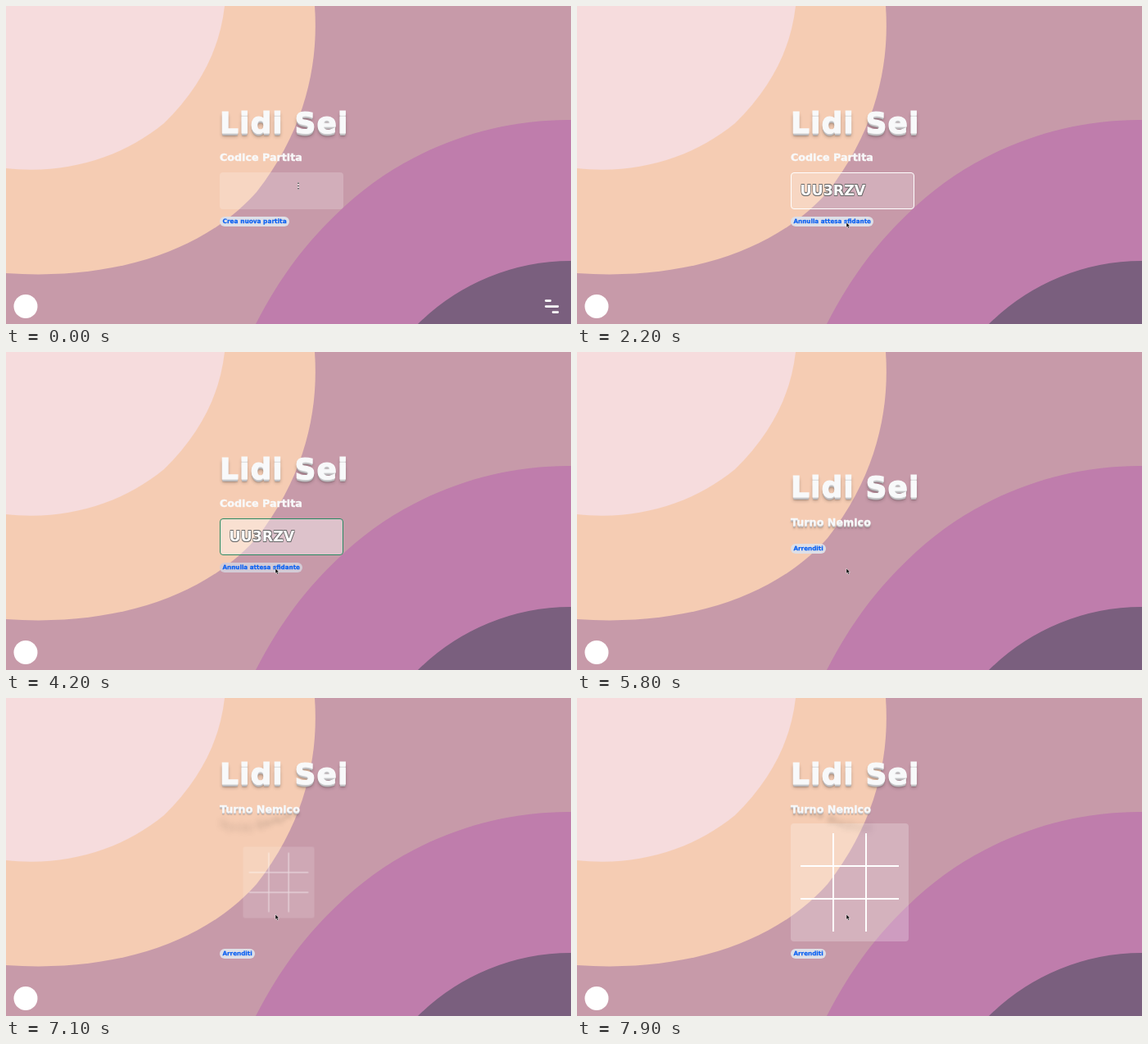
An HTML page that plays this animation: 690x388 px, repeating every 8 s.

```html
<!DOCTYPE html>
<html lang="it">
<head>
<meta charset="utf-8">
<title>Lidi Sei</title>
<style>
  html, body { margin: 0; width: 100%; height: 100%; overflow: hidden; }
  .stage {
    position: relative; width: 690px; height: 388px; overflow: hidden;
    background: #c79aa9; color: #f8f9fa;
    font: bold 12.7px/1 "DejaVu Sans", sans-serif; white-space: nowrap;
  }
  .stage * { box-sizing: border-box; }
  .stage div, .stage svg { position: absolute; }
  .anim { animation: 8s linear infinite; }
  .hard { animation: 8s step-end infinite; }

  .title {
    left: 261px; top: 125px; font-size: 36px; letter-spacing: 1.1px;
    -webkit-text-stroke: 1.2px #f8f9fa;
    text-shadow: 0 1px 0 #d4d4d6, 0 2px 0 #c6c6c8, 0 3px 0 #b8b6b9,
      0 4px 1px rgba(0,0,0,.12), 0 4px 4px rgba(0,0,0,.3);
    animation-name: title;
  }
  .heading { left: 261px; top: 178.8px; -webkit-text-stroke: .4px #f8f9fa; }
  .field {
    left: 261px; top: 202.6px; width: 151px; height: 45.2px;
    border: 1.2px solid transparent; border-radius: 4px;
    background: rgba(255,255,255,.2); animation-name: field;
  }
  .code {
    left: 272.5px; top: 217px; font-size: 17.4px; color: #fff;
    text-shadow: .6px .6px #666, -.6px .6px #666, .6px -.6px #666, -.6px -.6px #666;
  }
  .button {
    left: 261px; top: 257px; height: 12px; padding: 0 3px 0 3.5px;
    border-radius: 6px; background: #dedfe7; color: #0d62f2;
    font-size: 7.2px; line-height: 11.8px; -webkit-text-stroke: .25px #0d62f2;
  }
  .create { font-size: 7.4px; }
  .cancel { animation-name: cancel; }
  .give-up { top: 306px; animation-name: give-up; }
  .turn {
    left: 261px; top: 130px; animation-name: turn;
    --base: 0 1px 0 #d0cfd0, 0 2px 0 #bfbbbe, 0 3px 1px rgba(0,0,0,.15);
    text-shadow: var(--base); -webkit-text-stroke: .3px #f8f9fa;
  }
  .turn span { animation: shade 8s ease-in-out calc(var(--i) * .1s) infinite; }
  .board {
    left: 261px; top: 153px; width: 144px; height: 144px; border-radius: 4px;
    background: rgba(255,255,255,.24); animation-name: board;
  }

  .lobby { animation-name: until-game; }
  .game { animation-name: from-game; }
  .before { animation-name: until-click; }
  .after { animation-name: from-click; }
  .pointer { animation-name: pointer; }
  .ibeam { animation-name: ibeam; }
  .arrow { animation-name: arrow; }

  @keyframes until-click { 0% { opacity: 1 } 7.5%, 100% { opacity: 0 } }
  @keyframes from-click { 0% { opacity: 0 } 7.5%, 100% { opacity: 1 } }
  @keyframes until-game { 0% { opacity: 1 } 72.5%, 100% { opacity: 0 } }
  @keyframes from-game { 0% { opacity: 0 } 72.5%, 100% { opacity: 1 } }
  @keyframes ibeam { 0% { opacity: 1 } 3.75%, 100% { opacity: 0 } }
  @keyframes arrow { 0% { opacity: 0 } 3.75%, 100% { opacity: 1 } }
  @keyframes pointer {
    0%, 1% { transform: translate(357px, 219px); animation-timing-function: ease-out }
    6.25%, 100% { transform: translate(329px, 264px) }
  }
  @keyframes field {
    0%, 7.49% { border-color: transparent; background: rgba(255,255,255,.2) }
    7.5%, 42% { border-color: #fff; background: rgba(255,255,255,.2) }
    45%, 45.5% { border-color: #fff; background: rgba(255,255,255,.4) }
    47.5%, 100% { border-color: #2b8a62; background: rgba(255,255,255,.4) }
  }
  @keyframes cancel {
    0%, 45.5% { background: #dedfe7 }
    47.5%, 100% { background: #d3cbd6 }
  }
  @keyframes title {
    0%, 72.49% { transform: none }
    72.5%, 74.4% { transform: translateY(22px); animation-timing-function: cubic-bezier(.215,.61,.355,1) }
    85%, 100% { transform: translateY(-50px) }
  }
  @keyframes turn {
    0%, 74.4% { transform: translateY(72px); animation-timing-function: cubic-bezier(.215,.61,.355,1) }
    85%, 100% { transform: none }
  }
  @keyframes give-up {
    0%, 74.4% { transform: translateY(-72px); animation-timing-function: cubic-bezier(.215,.61,.355,1) }
    85%, 100% { transform: none }
  }
  @keyframes board {
    0%, 87.5% { transform: scale(0); opacity: 0; animation-timing-function: cubic-bezier(.215,.61,.355,1) }
    92.5%, 100% { transform: none; opacity: 1 }
  }
  @keyframes shade {
    0%, 72.5%, 97.5%, 100% { text-shadow: var(--base), 0 4px 3px rgba(0,0,0,.16) }
    85% { text-shadow: var(--base), 0 22px 10px rgba(0,0,0,.2) }
  }
</style>
</head>
<body>
<div class="stage">
  <svg width="690" height="388">
    <path fill="#f5ccb3" d="M0 0H377C382 70 366 150 306 227C241 300 130 335 0 326Z"/>
    <path fill="#f6dcdd" d="M0 0H267C261 52 238 99 193 143C143 184 76 206 0 198Z"/>
    <path fill="#bf7dac" d="M305 388C340 320 375 280 415 243C490 175 590 138 690 139V388Z"/>
    <path fill="#7a5f7e" d="M503 388A265 265 0 0 1 690 311V388Z"/>
    <circle cx="24" cy="366.5" r="14.5" fill="#fff"/>
    <path class="hard before" d="M659.3 359.6h5.5M659.3 366.6h14.6M668 373.6h5.9"
      stroke="#fff" stroke-width="2.6" stroke-linecap="round"/>
  </svg>

  <div class="hard lobby">
    <div class="heading">Codice Partita</div>
    <div class="anim field"></div>
    <div class="hard after code">UU3RZV</div>
    <div class="hard before"><div class="button create">Crea nuova partita</div></div>
    <div class="hard after"><div class="anim button cancel">Annulla attesa sfidante</div></div>
  </div>

  <div class="hard game">
    <svg class="anim board" viewBox="0 0 144 144">
      <path d="M12 52H132M12 92H132M52 12V132M92 12V132" stroke="#fff" stroke-width="2"/>
    </svg>
    <div class="anim turn">Turno Nemico</div>
    <div class="anim button give-up">Arrenditi</div>
  </div>

  <div class="anim title">Lidi Sei</div>

  <svg class="anim pointer" width="10" height="12" overflow="visible">
    <g class="hard ibeam">
      <path d="M0 -4V5" stroke="#fff" stroke-opacity=".6" stroke-width="2"/>
      <path d="M0 -3.5V5" stroke="#333" stroke-width="1.4" stroke-dasharray="1.6 1.6"/>
    </g>
    <path class="hard arrow" d="M0 0V6.2L1.4 5L2.4 7.3L3.6 6.8L2.6 4.6H4.4Z"
      fill="#000" stroke="#fff" stroke-width=".5"/>
  </svg>
</div>
<script>
  const turn = document.querySelector('.turn');
  turn.innerHTML = [...turn.textContent]
    .map((char, i) => `<span style="--i:${i}">${char}</span>`).join('');
</script>
</body>
</html>
```
